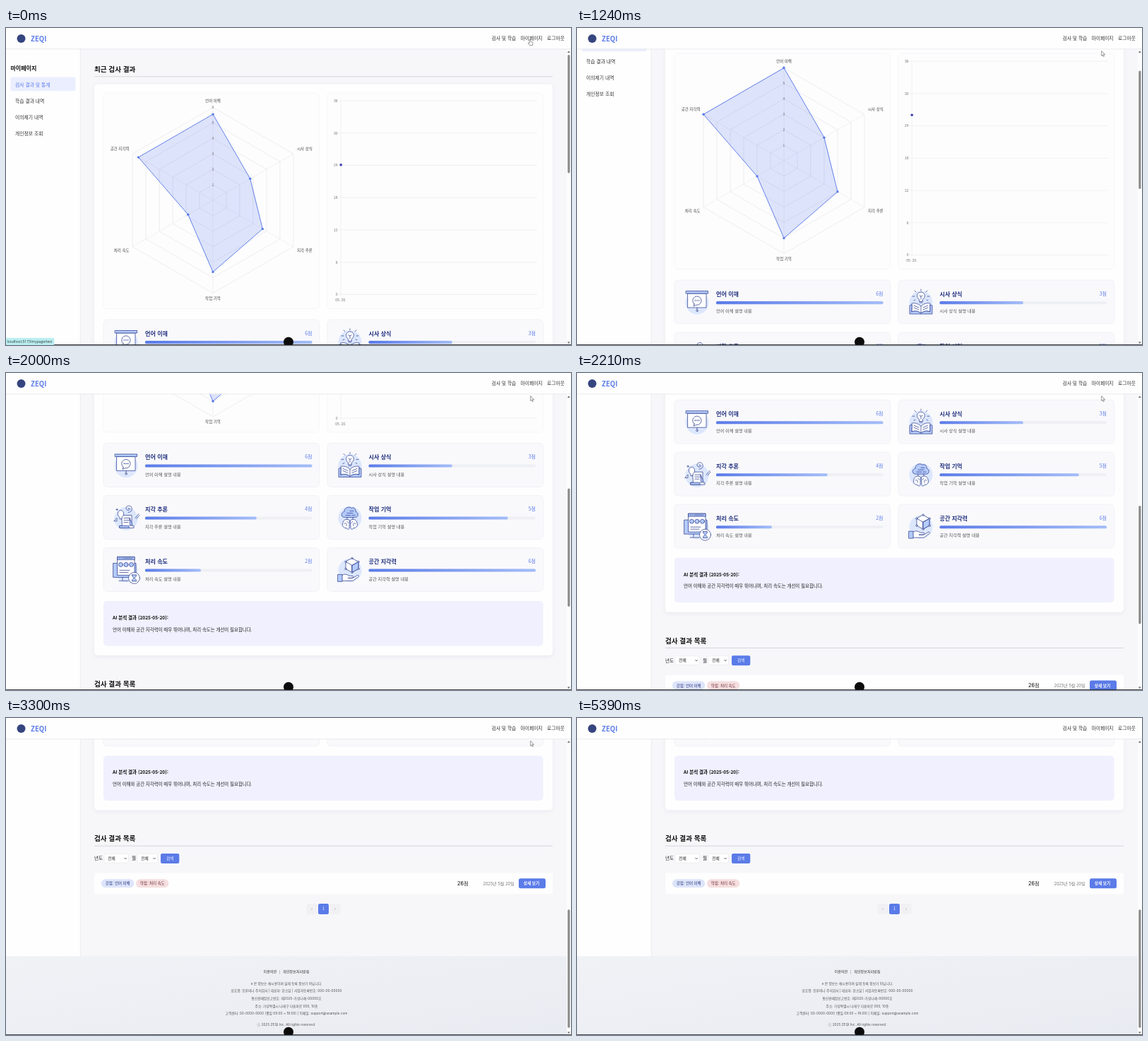
An HTML page for the animation above (5420 ms loop, 800 by 449 pixels).

```html
<!DOCTYPE html>
<html lang="ko">
<head>
<meta charset="utf-8">
<style>
html, body { margin: 0; width: 100%; height: 100%; overflow: hidden; background: #f7f7fa; }
svg { display: block; width: 800px; height: 449px; }
text { font-family: "Noto Sans CJK KR", "Noto Sans CJK", "Noto Sans", sans-serif; white-space: pre; }
.num { font-family: "Liberation Sans", Arial, sans-serif; }
.inter { font-family: Inter, "Noto Sans CJK KR", "Noto Sans CJK", sans-serif; }
.url { font-family: "Open Sans", sans-serif; }
.icon { fill: none; stroke: #2f3f8f; stroke-width: .75; stroke-linejoin: round; stroke-linecap: round; }
.icon .bg { fill: #dce7fd; stroke: none; }
.icon .w { fill: #fff; }
.icon .b { fill: #b4cbfa; }
.icon .d { fill: #2f3f8f; stroke: none; }
</style>
</head>
<body>
<svg id="stage" viewBox="0 0 800 449">
  <defs>
    <linearGradient id="bar"><stop stop-color="#5b7be8"/><stop offset="1" stop-color="#a4bdf8"/></linearGradient>
    <linearGradient id="foot" x2="1" y2="1"><stop stop-color="#f0f2f6"/><stop offset="1" stop-color="#e8ebf1"/></linearGradient>
    <filter id="soft" x="-5%" y="-5%" width="110%" height="110%"><feDropShadow dx="0" dy="1.5" stdDeviation="2.5" flood-color="#505078" flood-opacity=".09"/></filter>
  </defs>
</svg>
<script>
const LOOP = 5420, BLUE = '#5b7be8', NAVY = '#1f2f7c';
const stage = document.getElementById('stage');
const $ = id => document.getElementById(id);

// y is the vertical middle of the line
const text = (x, y, size, str, fill = '#333', attrs = '') =>
  `<text x="${x}" y="${y + size * .37}" font-size="${size}" fill="${fill}" ${attrs}>${str}</text>`;
const rect = (x, y, w, h, fill, r = 0, attrs = '') =>
  `<rect x="${x}" y="${y}" width="${w}" height="${h}" rx="${r}" fill="${fill}" ${attrs}/>`;
const line = (x1, y1, x2, y2, stroke, w = .6) =>
  `<path d="M${x1} ${y1}L${x2} ${y2}" stroke="${stroke}" stroke-width="${w}" fill="none"/>`;
const MID = 'text-anchor="middle"', END = 'text-anchor="end"', BOLD = 'font-weight="700"', SEMI = 'font-weight="500"';

// Radar geometry
const CX = 293, CY = 244, STEP = 21.92;
const spoke = (i, v) => {
  const a = i * Math.PI / 3;
  return [CX + Math.sin(a) * v * STEP, CY - Math.cos(a) * v * STEP];
};
const hexagon = values => values.map((v, i) => spoke(i, v).map(n => n.toFixed(2)).join()).join(' ');

const skills = [
  ['언어 이해', 6, 293, 103, MID], ['시사 상식', 3, 412, 171.3, ''], ['지각 추론', 4, 412, 314.7, ''],
  ['작업 기억', 5, 293, 383, MID], ['처리 속도', 2, 174.5, 314.7, END], ['공간 지각력', 6, 174.5, 171.3, END]
];

const icons = [
  `<circle class="bg" cy="1" r="16.5"/><path class="w" d="M-13-12H13V8H-13Z"/><path class="b" d="M-15.5-15.5H15.5V-12H-15.5Z"/>
   <path class="w" d="M-4 3L-5 6L-1 4.3A6.2 6.2 0 1 0-4 3Z"/><path d="M0 8V11"/><circle class="w" cy="12.3" r="1.3"/>
   <g class="d"><circle cx="-2.6" cy="-2" r=".8"/><circle cy="-2" r=".8"/><circle cx="2.6" cy="-2" r=".8"/></g>`,
  `<circle class="bg" cy="1" r="16.5"/><path class="w" d="M-2.5-1V-3.5C-8-8-5-14 0-14S8-8 2.5-3.5V-1Z"/><path d="M-2 1H2M0-4V-8L-2-9M0-8L2-9"/>
   <path d="M0-16V-18M-7-14L-9-16M7-14L9-16M-9-8H-12M9-8H12M-8-3L-10-2M8-3L10-2"/>
   <path class="w" d="M0 6C-4 2-9 1-13 2V14C-8 12-4 13 0 16C4 13 8 12 13 14V2C9 1 4 2 0 6V16"/>
   <path class="b" d="M-13 4L-16 5V17H16V5L13 4V14C8 12 4 13 0 16C-4 13-8 12-13 14Z"/><path d="M-10 5L-3 8M-10 8L-3 11M10 5L3 8M10 8L3 11"/>`,
  `<circle class="bg" cy="2" r="16.5"/><path class="w" d="M-6-3H8V12H11V15H-9V12H-6Z"/><path class="b" d="M-9 12H4V15H-9Z"/>
   <path d="M-3 1H5M-3 4H5M-3 7H3"/><path class="w" d="M-9 2V0C-14-4-11-10-7.5-10S-1-4-6 0V2Z"/>
   <path d="M3-12C3-14 6-13 5-11C4-9 0-10 0-13C0-17 7-18 8-13C9-9 6-7 3-7"/>
   <path class="b" d="M5 1L9 10L6 12Z"/><path d="M13 1L18-5M15 2L19-3"/><path class="w" d="M-17 5L-13 1V5Z"/><circle cx="-13" cy="-11" r="1"/>`,
  `<circle class="bg" cy="1" r="16.5"/><path class="b" d="M-8 0C-13 0-13-7-8-8C-8-14-1-16 2-13C6-15 9-11 8-8C13-7 12 0 8 0Z"/>
   <path d="M-4-6H4M-6-3H1M0-9H5M3-3H7M-4 0V3M4 0V3"/><path class="w" d="M-1 4C-5 1-10 4-10 8C-12 12-8 16-5 15C-4 18-1 17-1 15Z"/>
   <path class="w" d="M1 4C5 1 10 4 10 8C12 12 8 16 5 15C4 18 1 17 1 15Z"/><path d="M-8 9C-5 7-4 10-5 12M-4 6L-2 8M8 9C5 7 4 10 5 12M4 6L2 8"/>`,
  `<circle class="bg" cy="1" r="16.5"/><path class="b" d="M-18-9H14V11H-18Z"/><path class="w" d="M-12-18H12V8H-12Z"/><path class="b" d="M-12-18H12V-14H-12Z"/>
   <path d="M-10-16H-9M-7-16H-6M-4-16H9M-9 1H5M-9 4H3M-5 11V15M-10 16H3"/>
   <g class="b"><circle cx="-7.5" cy="-7" r="3"/><circle cy="-7" r="3"/><circle cx="7.5" cy="-7" r="3"/></g>
   <circle class="w" cx="11.5" cy="12" r="8"/><path class="b" d="M8.5 7.5H14.5C14.5 11 12 11 12 12S14.5 13 14.5 16.5H8.5C8.5 13 11 13 11 12S8.5 11 8.5 7.5Z"/>`,
  `<circle class="bg" cy="1" r="16.5"/><path class="w" d="M3-16L12-11V-1L3 4L-6-1V-11Z"/><path class="b" d="M3-6L12-11V-1L3 4Z"/><path d="M-6-11L3-6L12-11M3-6V4"/>
   <g class="w"><circle cx="3" cy="-16" r="1.2"/><circle cx="12" cy="-11" r="1.2"/><circle cx="12" cy="-1" r="1.2"/><circle cx="3" cy="4" r="1.2"/><circle cx="-6" cy="-1" r="1.2"/><circle cx="-6" cy="-11" r="1.2"/></g>
   <path class="w" d="M-11 8C-7 5-3 8 0 9H4C6 10 4 12 2 12H-3H4L11 8C13 8 13 10 11 11L4 16H-11Z"/><path class="b" d="M-17 7H-11V17H-17Z"/>`
];

function sidebar() {
  const items = ['검사 결과 및 통계', '학습 결과 내역', '이의제기 내역', '개인정보 조회'];
  return rect(0, 30, 105, 891, '#fefefe') + line(105.3, 30, 105.3, 921, '#e9e9ee', .8) +
    text(6.5, 57.5, 8, '마이페이지', '#111', BOLD) + rect(6.5, 69.5, 92, 19.8, '#ebeefe', 2.5) +
    items.map((s, i) => text(13, 80 + 23 * i, 6.8, s, i ? '#333' : BLUE, SEMI)).join('');
}

function heading(y, str) {
  return text(125, y, 9.6, str, '#111', BOLD) + line(125, y + 10.3, 774, y + 10.3, '#cdced5', .8);
}

function radar() {
  let s = '';
  for (let v = 1; v <= 6; v++)
    s += `<polygon points="${hexagon(Array(6).fill(v))}" fill="none" stroke="#e2e2e5" stroke-width=".6"/>`;
  skills.forEach(([name, , x, y, anchor], i) => {
    s += line(CX, CY, ...spoke(i, 6), '#e5e5e8', .5) + text(x, y, 5.5, name, '#444', anchor);
  });
  s += `<polygon id="area" fill="${BLUE}" fill-opacity=".2" stroke="${BLUE}" stroke-width=".95"/>`;
  for (let v = 1; v <= 6; v++) s += text(CX, CY - v * STEP, 5, v, '#777', `${MID} class="num"`);
  return s + skills.map((_, i) => `<circle id="p${i}" r="1.7" fill="${BLUE}"/>`).join('');
}

function trend() {
  let s = line(474.2, 103, 474.2, 380, '#e6e6e9', .5);
  for (let v = 0; v <= 36; v += 6) {
    const y = 377.5 - v * 7.625;
    s += line(471, y, 752, y, '#e8e8eb', .6) + text(469.5, y, 5, v, '#777', `${END} class="num"`);
  }
  return s + text(474, 385.3, 5, '05. 20.', '#777', `${MID} class="num"`) + '<circle id="dot" cx="474.2" r="1.8" fill="#3b42ae"/>';
}

function skillCard([name, score], i) {
  const x = i % 2 ? 455 : 138, y = 413 + 74 * (i >> 1), left = x + (i % 2 ? 58.5 : 59), w = 236.5;
  return rect(x, y, 305.7, 62, '#f9f9fc', 5, 'stroke="#eeeef4" stroke-width=".7"') +
    `<g class="icon" transform="translate(${x + 32} ${y + 31})">${icons[i]}</g>` +
    text(left, y + 20, 8.1, name, NAVY, BOLD) +
    text(left + w, y + 19.5, 7, score + '점', BLUE, `${END} ${SEMI}`) +
    rect(left, y + 30, w, 4.2, '#eff0f4', 2.1) + rect(left, y + 30, w * score / 6, 4.2, 'url(#bar)', 1.6) +
    text(left, y + 44, 6.2, name + ' 설명 내용', '#555');
}

function results() {
  const select = (x, w) => rect(x, 775.7, w, 12.6, '#fff', 2, 'stroke="#e6e6eb" stroke-width=".6"') +
    text(x + 5.3, 782, 5.7, '전체', '#222') +
    `<path d="M${x + w - 6} 781.2l1.6 1.6 1.6-1.6" fill="none" stroke="#222" stroke-width=".8"/>`;
  return heading(754, '검사 결과 목록') +
    text(125, 782, 6.6, '년도', '#222') + select(139, 34.5) + text(178, 782, 6.6, '월', '#222') + select(186, 28.5) +
    rect(219, 775, 26.3, 14, BLUE, 2.2) + text(232.2, 782, 5.6, '검색', '#fff', MID) +
    rect(125, 802.5, 649, 30, '#fefefe', 2) +
    rect(135, 811.4, 46.3, 12, '#dde5fb', 6) + text(158.2, 817.4, 5.5, '강점: 언어 이해', '#27347a', MID) +
    rect(184, 811.4, 46.3, 12, '#f5dedf', 6) + text(207.2, 817.4, 5.5, '약점: 처리 속도', '#71303a', MID) +
    text(639, 817.4, 7.2, '26점', '#222', `${SEMI} class="inter"`) +
    text(719.5, 817.4, 6.1, '2025년 5월 20일', '#777', END) +
    rect(726, 810.4, 38, 14, BLUE, 2.5) + text(744, 817.4, 5.7, '상세 보기', '#fff', `${MID} ${BOLD}`) +
    rect(425.5, 846, 15, 15, '#f1f1f4', 2.5) + rect(442, 846, 15, 15, BLUE, 2.5) + rect(458.5, 846, 15, 15, '#f1f1f4', 2.5) +
    text(433, 853, 7, '‹', '#999', MID) + text(449.5, 853.5, 5.5, '1', '#fff', MID) + text(465.8, 853, 7, '›', '#999', MID);
}

function footer() {
  const lines = [
    [959, '※ 본 정보는 예시용이며 실제 등록 정보가 아닙니다.'],
    [969.5, '상호명: 모루비나 주식회사 | 대표자: 한소담 | 사업자등록번호: 000-00-00000'],
    [980, '통신판매업신고번호: 제2025-가상나래-00000호'],
    [991, '주소: 가상특별시 나래구 다솜마로 000, 10층'],
    [1001.5, '고객센터: 00-0000-0000 (평일 09:00 ~ 18:00) | 이메일: support@example.com'],
    [1017, 'ⓒ 2025 ZEQI Inc. All rights reserved.']
  ];
  return rect(0, 920.5, 794, 120, 'url(#foot)') +
    text(364.5, 942.5, 5.1, '이용약관', '#333', SEMI) + text(387.7, 942.5, 5, '|', '#666', MID) +
    text(392, 942.5, 5.1, '개인정보처리방침', '#333', SEMI) +
    lines.map(([y, s]) => text(397, y, 4.75, s, '#555', `${MID} class="inter"`)).join('');
}

function chrome() {
  return rect(0, 0, 800, 29.5, '#fefefe') + line(0, 29.8, 800, 29.8, '#e8e8ed', .8) +
    '<circle cx="21.5" cy="15" r="6" fill="#35457f"/>' +
    text(35, 15.2, 9.6, 'ZEQI', BLUE, BOLD) +
    text(687.5, 15, 6.75, '검사 및 학습') + text(728.5, 15, 6.75, '마이페이지') + text(766, 15, 6.75, '로그아웃') +
    rect(794, 30.2, 6, 419, '#fcfcfc') +
    '<path d="M794.8 35l2-2.8 2 2.8zM794.8 444.5l2 2.8 2-2.8z" fill="#777"/>' +
    rect(795.3, 38, 3.2, 167.5, '#8b8b8b', 1.6, 'id="thumb"') +
    rect(0, 448.2, 800, .8, '#222') +
    '<circle cx="400" cy="444.7" r="7" fill="#0c0c0c"/>' +
    `<g id="status">${rect(0, 439, 68.3, 10, '#b9eef0', 1)}${text(1.5, 444, 4.95, 'localhost:5173/mypage/test', '#333', 'class="url"')}</g>` +
    `<g id="cursor" fill="#fff" stroke="#555" stroke-width=".6" stroke-linejoin="round">
       <path id="arrow" d="M0 0V7L1.6 5.5L2.7 8L3.8 7.5L2.7 5.1H4.8Z"/>
       <path id="hand" d="M-.8 0Q0-1 .8 0V3L3.6 3.7Q4.2 4 4 5L3.4 8H-.6L-2.8 5Q-2.5 4-.8 5Z"/></g>`;
}

stage.insertAdjacentHTML('beforeend',
  `${rect(0, 0, 800, 449, '#f7f7fa')}<g id="page">${sidebar()}${heading(58.5, '최근 검사 결과')}` +
  rect(125, 79.5, 649, 634, '#fefefe', 5, 'filter="url(#soft)"') +
  [138, 455].map(x => rect(x, 92, 305.7, 305.5, '#fdfdfe', 5, 'stroke="#f4f4f8" stroke-width=".8"')).join('') +
  radar() + trend() + skills.map(skillCard).join('') +
  rect(138, 636.5, 622.5, 63.5, '#f0f0fe', 5) +
  text(151, 660, 6.55, 'AI 분석 결과 (2025-05-20):', '#111', BOLD) +
  text(151, 676.8, 6.45, '언어 이해와 공간 지각력이 매우 뛰어나며, 처리 속도는 개선이 필요합니다.', '#222') +
  `${results()}${footer()}</g>${chrome()}`);

const clamp = v => Math.min(1, Math.max(0, v));
const ramp = (t, from, to) => clamp((t - from) / (to - from));
const smooth = p => p * p * (3 - 2 * p);

// Wheel bursts: start, end, notches
const bursts = [[1030, 1650, 5], [1730, 2190, 4], [2300, 2770, 3], [2850, 3200, 2]];
const NOTCH = 41.65;

function draw(t) {
  const grow = 1 - (1 - clamp((t + 478) / 1000)) ** 4;
  const values = skills.map(s => s[1] * grow);
  $('area').setAttribute('points', hexagon(values));
  values.forEach((v, i) => {
    const [x, y] = spoke(i, v);
    $('p' + i).setAttribute('cx', x);
    $('p' + i).setAttribute('cy', y);
  });
  $('dot').setAttribute('cy', 377.5 - 26 * 7.625 * grow);

  const scroll = bursts.reduce((sum, [a, b, n]) => sum + n * NOTCH * smooth(ramp(t, a, b)), 0);
  $('page').setAttribute('transform', `translate(0 ${-scroll})`);
  $('thumb').setAttribute('y', 38 + scroll * .4);

  const hover = t < 880;
  const leave = ramp(t, 4000, 4480) ** 2.4;
  const x = 742 + .7 * ramp(t, 800, 950) - 318 * leave;
  const y = 16.5 + 6 * smooth(ramp(t, 100, 650)) + 10 * smooth(ramp(t, 800, 980)) + 417 * leave;
  $('cursor').setAttribute('transform', `translate(${x} ${y})`);
  $('cursor').style.display = leave < 1 ? '' : 'none';
  $('hand').style.display = hover ? '' : 'none';
  $('arrow').style.display = hover ? 'none' : '';
  $('status').style.opacity = 1 - ramp(t, 1080, 1230);
}

function tick() {
  draw(performance.now() % LOOP);
  requestAnimationFrame(tick);
}
tick();
</script>
</body>
</html>
```
